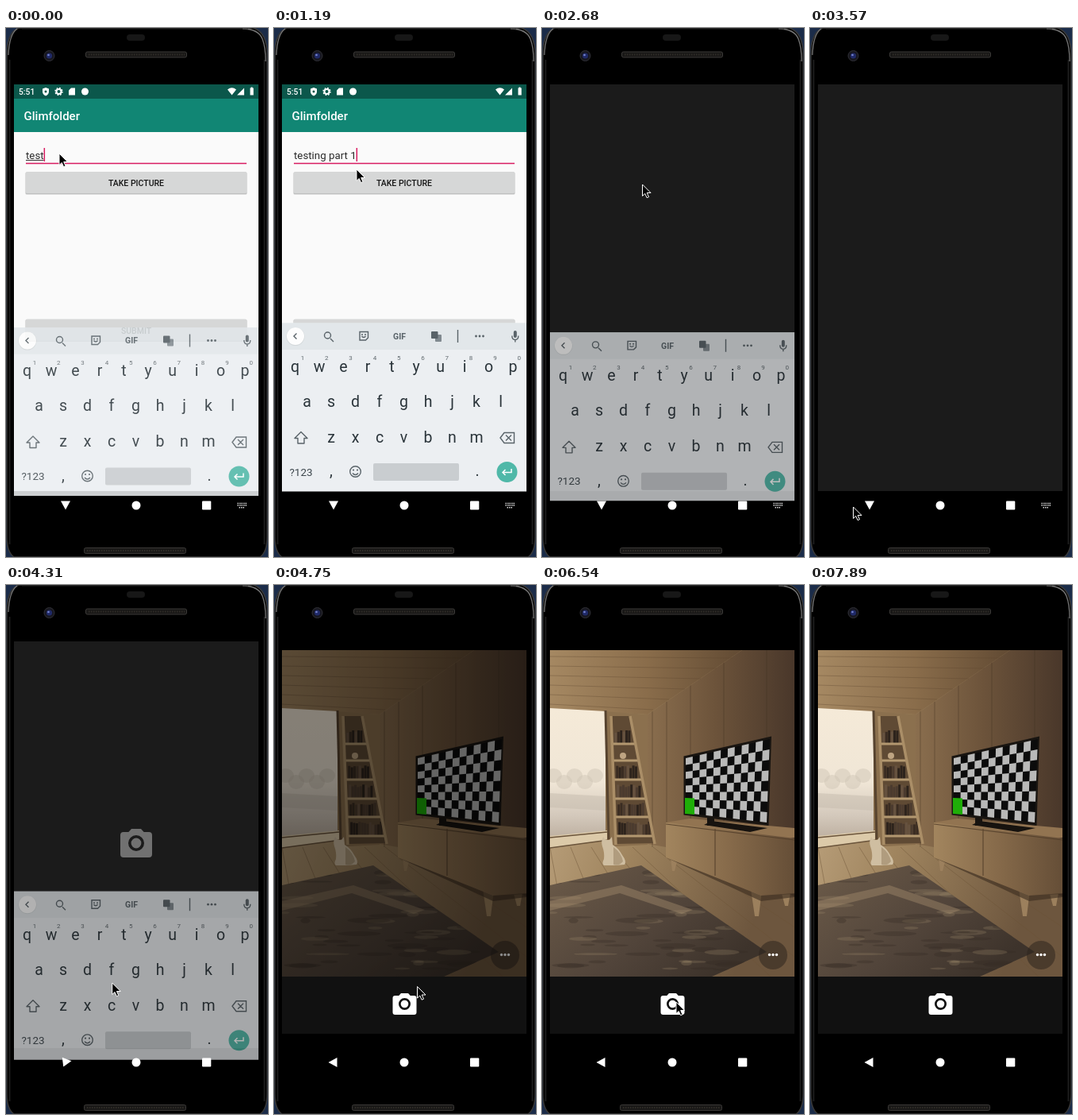
Recreate the animation shown at these times as an HTML page. Size 330 by 666 pixels, loop 8 s.

```html
<!DOCTYPE html>
<html lang="en">
<head>
<meta charset="utf-8">
<title>Phone camera demo</title>
<style>
  html, body { margin: 0; width: 100%; height: 100%; overflow: hidden; background: #000; }
  svg { display: block; width: 100vw; height: 100vh; }
  text { font-family: Roboto, "Open Sans", sans-serif; white-space: pre; }
  .mid { text-anchor: middle; }
  .medium { font-weight: 500; }
  .bold { font-weight: 700; }
  .key { font-size: 19.5px; fill: #2a343a; text-anchor: middle; }
  .hint { font-size: 8px; fill: #5f686d; text-anchor: middle; }
  .dlg { font-size: 13px; letter-spacing: .4px; fill: #eceeee; }
  .line { fill: none; stroke: #596369; stroke-width: 1.4; }
</style>
</head>
<body>
<svg viewBox="0 0 330 666" preserveAspectRatio="none">
  <defs>
    <clipPath id="screen"><path d="M10 71H318V583H10z"/></clipPath>
    <clipPath id="photo"><path d="M10 82H318V493H10z"/></clipPath>
    <clipPath id="rug"><path d="M10 378L125 353 283 462 214 493H10z"/></clipPath>
    <linearGradient id="edge"><stop offset="0" stop-color="#101010"/><stop offset=".5" stop-color="#3c3c3c"/><stop offset="1" stop-color="#090909"/></linearGradient>
    <linearGradient id="ceil"><stop offset="0" stop-color="#a58862"/><stop offset=".5" stop-color="#8a6d4b"/><stop offset="1" stop-color="#614a33"/></linearGradient>
    <linearGradient id="wall"><stop offset="0" stop-color="#8a6e4e"/><stop offset=".45" stop-color="#6d543b"/><stop offset="1" stop-color="#49372a"/></linearGradient>
    <linearGradient id="sky" x2="0" y2="1"><stop offset="0" stop-color="#f5ead8"/><stop offset=".55" stop-color="#f0e6d6"/><stop offset=".8" stop-color="#d3c8bb"/><stop offset="1" stop-color="#b8aa9a"/></linearGradient>
    <linearGradient id="floor" x2="1" y2=".5"><stop offset="0" stop-color="#c9b08c"/><stop offset=".5" stop-color="#a0855f"/><stop offset="1" stop-color="#6d563e"/></linearGradient>
    <linearGradient id="mat" x2="1" y2=".6"><stop offset="0" stop-color="#6c5b49"/><stop offset=".6" stop-color="#51443a"/><stop offset="1" stop-color="#3d332b"/></linearGradient>
    <linearGradient id="chest"><stop offset="0" stop-color="#a2855e"/><stop offset=".5" stop-color="#866a4a"/><stop offset="1" stop-color="#654e37"/></linearGradient>
    <path id="cam" fill-rule="evenodd" d="M-3-10L-4.83-8H-8a2 2 0 0 0-2 2V6a2 2 0 0 0 2 2H8a2 2 0 0 0 2-2V-6a2 2 0 0 0-2-2H4.83L3-10zM5-1A5 5 0 1 1-5-1 5 5 0 1 1 5-1zM3.2-1A3.2 3.2 0 1 0-3.2-1 3.2 3.2 0 1 0 3.2-1z"/>
  </defs>

  <!-- phone body -->
  <rect width="330" height="666" fill="#1b2c49"/>
  <path d="M16 0H312Q329 6 329 34V640Q329 660 320 666H10Q1 660 1 640V34Q1 6 16 0z" fill="#000" stroke="#383838" stroke-width="1.5"/>
  <path d="M4.500 40V650M325.500 40V650" stroke="#1c1c1c" stroke-width="2"/>
  <path d="M14 1Q4 8 3 34M298 1Q318 1 323 14 327 24 327 42" fill="none" stroke="#777" stroke-width="1.3"/>
  <path d="M20 1H305" stroke="#222"/>
  <rect x="152" y="8" width="23" height="8" rx="4" fill="#171717"/>
  <g fill="#191817" stroke="#3b3937">
    <rect x="100.500" y="30" width="127" height="7" rx="2"/>
    <rect x="98.500" y="654.500" width="128" height="7" rx="2"/>
  </g>
  <path d="M104 33.500H225M102 658H224" stroke="#302d28" stroke-width="2" stroke-dasharray="1.500 1.500"/>
  <circle cx="54.500" cy="35" r="6.500" fill="#17171f" stroke="#303036"/>
  <circle cx="54.500" cy="35" r="3.600" fill="#202a68"/>
  <circle cx="53.500" cy="34" r="1.300" fill="#7684cf"/>

  <g clip-path="url(#screen)">
    <g id="form">
      <path fill="#fafafa" d="M10 71H318V583H10z"/>
      <path fill="#118674" d="M10 89H318V131H10z"/>
      <text class="medium" x="22.500" y="115.500" font-size="15" fill="#fff">Glimfolder</text>
      <path fill="#d81b60" d="M25 169.700H303V171.200H25z"/>
      <text id="entry" x="25" y="164.500" font-size="13.3" fill="#2a2a2a"></text>
      <path id="under" stroke="#333"/>
      <path id="caret" stroke="#d81b60" stroke-width="1.500"/>
      <g fill="#bfc0c0"><rect x="24.500" y="181.500" width="279" height="28" rx="1.500"/><rect x="24.500" y="367" width="279" height="28" rx="1.500"/></g>
      <g fill="#d6d7d7"><rect x="25" y="181" width="278" height="27" rx="1.500"/><rect x="25" y="366.500" width="278" height="27" rx="1.500"/></g>
      <g class="mid medium" font-size="10.5" fill="#161616"><text x="164" y="198.700">TAKE PICTURE</text><text x="164" y="384.500">SUBMIT</text></g>
    </g>
    <g id="status">
      <path fill="#0b574b" d="M10 71H318V89H10z"/>
      <g fill="#fff">
        <text class="medium" x="16" y="84" font-size="10.3">5:51</text>
        <path d="M50 75l4 1.500v3.500q0 3.500-4 5.500-4-2-4-5.500v-3.500z"/>
        <circle cx="66.500" cy="80" r="3" fill="none" stroke="#fff" stroke-width="2"/>
        <circle cx="66.500" cy="80" r="4.500" fill="none" stroke="#fff" stroke-width="1.400" stroke-dasharray="1.770"/>
        <path d="M82 75.500h5v9h-8v-6z"/>
        <circle cx="99.500" cy="80" r="4.500"/>
        <path d="M279 77.500q5.500-4.500 11 0l-5.500 7zM300 75.500v9h-9zM307.500 75.500h1v-1h2v1h1.200v9h-4.200z"/>
      </g>
      <circle cx="50" cy="80" r="1.500" fill="#0b574b"/>
    </g>
    <path id="dark" fill="#1b1b1b" d="M10 71H318V583H10z"/>
    <use id="splash" href="#cam" transform="translate(164 327) scale(2)" fill="#fff"/>
  </g>

  <g id="app">
    <path d="M10 71H318V583H10z"/>
    <path fill="#111" d="M10 493H318V565H10z"/>
    <g id="scene" clip-path="url(#photo)"></g>
    <use href="#cam" transform="translate(164.500 529) scale(1.500)" fill="#fff"/>
    <g id="dialog">
      <rect x="19" y="204" width="293" height="294.500" rx="10" fill="#2e3539" opacity=".88"/>
      <text class="dlg bold" x="43" y="245" style="font-size:18px">Entering camera mode</text>
      <text class="dlg" x="43" y="272.500">Hold</text>
      <path d="M75.500 264h3.500l5 8.500h3M81.500 264H87" fill="none" stroke="#eceeee" stroke-width="1.100"/>
      <text class="dlg" x="91" y="272.500">Option to control camera via the</text>
      <text class="dlg" x="43" y="288.500">following methods:</text>
      <rect x="50" y="304" width="26.500" height="36.500" rx="12.500" fill="#fff"/>
      <path d="M50 319H77M63.300 303.500V319" stroke="#343b3e" stroke-width="1.600"/>
      <text class="dlg" x="99" y="326"><tspan class="bold">Rotate</tspan> with mouse</text>
      <path d="M58 360h10v9.500H58zM47 371h10v9.500H47zM58 371h10v9.500H58zM69 371h10v9.500H69z" fill="#fff"/>
      <text class="dlg" x="99" y="374"><tspan class="bold">Move</tspan> with WASDQE keys</text>
      <rect x="45.500" y="409.500" width="15.500" height="15.500" rx="1" fill="none" stroke="#c9cccd" stroke-width="1.600"/>
      <text class="dlg" x="73" y="421.500">Don't remind me again</text>
      <rect x="200" y="440" width="88" height="36" rx="2" fill="#20282b"/>
      <rect x="200" y="439" width="88" height="36" rx="2" fill="#46958a"/>
      <text class="bold mid" x="244" y="461.300" font-size="12" letter-spacing=".5" fill="#fff">GOT IT</text>
    </g>
  </g>

  <g id="board">
    <path fill="#eceff2" d="M10 371.500H318V583.500H10z"/>
    <path fill="#e2e7ea" d="M10 371.500H318V405H10z"/>
    <circle cx="27" cy="388.500" r="11.500" fill="#d3d8da"/>
    <circle cx="27" cy="388" r="11" fill="#fdfdfd"/>
    <g class="line">
      <path d="M28.500 384.500l-3.500 3.500 3.500 3.500M71 391l4 4M231.500 380V396" />
      <circle cx="67.500" cy="387" r="4"/>
      <path d="M108 382.500h10.500v7.500l-3 3H108zM110.500 388q2.500 3 5 0"/>
      <path d="M299.800 387.500q0 5 4 5t4-5M303.800 392.500v3"/>
      <path d="M34 508.500l8 8h-4v6.500h-8v-6.500h-4z" stroke-linejoin="round"/>
      <path d="M285 516l5-6.500h12.500v13H290zM292 512.500l7 7M299 512.500l-7 7"/>
      <circle cx="102.500" cy="558.500" r="6.800"/><path d="M99 560.500q3.500 4 7 0"/>
    </g>
    <g fill="#596369">
      <text class="mid bold" x="158" y="391.700" font-size="10.5">GIF</text>
      <rect x="198" y="382" width="8.500" height="9" rx="1"/><rect x="203" y="386" width="8" height="9" rx="1" opacity=".7"/>
      <circle cx="254.500" cy="388" r="1.400"/><circle cx="259" cy="388" r="1.400"/><circle cx="263.500" cy="388" r="1.400"/>
      <rect x="301.800" y="381" width="4" height="9" rx="2"/>
      <circle cx="111" cy="386" r="1"/><circle cx="115" cy="386" r="1"/>
      <circle cx="100" cy="556.500" r="1.100"/><circle cx="105" cy="556.500" r="1.100"/>
    </g>
    <g id="keys"></g>
    <text class="mid" x="34" y="563.500" font-size="13.500" fill="#3d474d">?123</text>
    <text class="key" x="72" y="564">,</text><text class="key" x="256" y="564">.</text>
    <rect x="125" y="548" width="108" height="22" rx="2" fill="#c9cdd0"/>
    <circle cx="293.500" cy="559" r="13" fill="#4fb8a8"/>
    <path d="M299 555v4.500h-11M291.500 556l-3.500 3.500 3.500 3.500" fill="none" stroke="#fff" stroke-width="1.500"/>
  </g>

  <!-- navigation bar -->
  <g fill="#fff">
    <path id="back" d="M-6 0L5-6V6z"/>
    <circle cx="164" cy="601" r="5.500"/>
    <rect x="247" y="595.500" width="11.300" height="11" rx="1"/>
    <path id="ime" d="M291.500 598.500h11.500M291.500 601h11.500M293.500 603.700h7" fill="none" stroke="#ddd" stroke-width="1.400" stroke-dasharray="1.500 1"/>
  </g>
  <path id="mouse" d="M0 0V14.500L3.300 11.500 5.600 16.700 8 15.700 5.700 10.500H10.500z" fill="#000" stroke="#fff" stroke-width="1"/>
</svg>

<script>
const $ = id => document.getElementById(id);
const NS = 'http://www.w3.org/2000/svg';

function add(parent, tag, attrs, text) {
  const el = document.createElementNS(NS, tag);
  for (const k in attrs) el.setAttribute(k, attrs[k]);
  if (text) el.textContent = text;
  return parent.appendChild(el);
}

// keyboard letters
function row(letters, x, y) {
  [...letters].forEach((c, i) => add($('keys'), 'text', { class: 'key', x: x + i * 30.5, y }, c));
}
row('qwertyuiop', 26.5, 432.500);
row('asdfghjkl', 41.5, 476.500);
row('zxcvbnm', 72, 521.500);
[...'1234567890'].forEach((c, i) => add($('keys'), 'text', { class: 'hint', x: 36 + i * 30.3, y: 418 }, c));

// room
const scene = $('scene');
const shape = (d, fill, opacity = 1) => add(scene, 'path', { d, fill, opacity });
const stroke = (d, color, width = 1, opacity = 1) =>
  add(scene, 'path', { d, fill: 'none', stroke: color, 'stroke-width': width, opacity });
let seed = 7;
const rnd = () => (seed = seed * 16807 % 2147483647) / 2147483647;

function room() {
  shape('M10 82H318V493H10z', 'url(#floor)');
  for (let i = 0; i < 8; i++) stroke(`M${10 + i * 26} 330L${40 + i * 62} 493`, '#6a5237', 1, .45);
  shape('M133 163L252 82H318V392L156 330 133 326z', 'url(#wall)');
  for (let i = 1; i < 6; i++) {
    const x = 133 + i * i * 6;
    stroke(`M${x} ${163 - (x - 133) * .68}V330`, '#3f2e20', 1, .4);
  }
  shape('M10 82H252L133 163 10 156z', 'url(#ceil)');
  for (let i = 0; i < 6; i++) stroke(`M10 ${90 + i * 12}L${240 - i * 20} ${92 + i * 13}`, '#5c452e', 1, .35);
  shape('M78 159L133 163V327L78 330z', '#8b704e');
  shape('M10 155L80 159V318L10 325z', 'url(#sky)');
  for (let i = 0; i < 5; i++) add(scene, 'ellipse', { cx: 15 + i * 13, cy: 240 + i % 2 * 8, rx: 10, ry: 9, fill: '#d0c5b6', opacity: .5 });
  shape('M10 262L80 266V284L10 280z', '#c6bbad', .5);
  shape('M10 316L82 309V321L10 331z', '#dccaa9');
  stroke('M10 331L84 321M10 318L82 311', '#6a543b', 1.500);
  stroke('M80 158L84 320', '#57432f', 3);
  shelf();
  shape('M10 378L125 353 283 462 214 493H10z', 'url(#mat)');
  const rug = add(scene, 'g', { 'clip-path': 'url(#rug)' });
  for (let i = 0; i < 65; i++) {
    const light = rnd() < .45;
    add(rug, 'ellipse', { cx: 10 + rnd() * 250, cy: 358 + rnd() * 132, rx: 6 + rnd() * 22, ry: 1 + rnd() * 2.500,
      fill: light ? '#a18a6d' : '#322a24', opacity: light ? .25 : .3 });
  }
  shape('M10 398L100 378 190 409 176 414 98 388 10 410z', '#aa9271', .4);
  // cat
  shape('M77 317l3 4h5l3-4 1 10q8 5 12 13 6 8 3 12l-12 1H78q-3-2 0-8 1-8-2-16-2-6 1-12z', '#cfbea1');
  shape('M90 330q10 7 12 18-5 6-12 4z', '#9f8a6c', .65);
  // cabinet
  shape('M162 344h9l-4 16h-3zM262 376h16l-5 41h-5zM300 381h14l-4 23h-4z', '#9c805d');
  shape('M156 299L186 294 318 306V318L276 325z', '#927451');
  shape('M156 299L318 319V389L276 391 156 343z', 'url(#chest)');
  stroke('M218 307V366M156 301L318 321', '#503c29', 1.200, .8);
  shape('M156 343L276 391 318 388V393L276 398z', '#3b2c1f', .6);
  tv();
  add(scene, 'circle', { cx: 291, cy: 466, r: 18, fill: '#2e251e', opacity: .55 });
  for (const x of [286.500, 291, 295.500]) add(scene, 'circle', { cx: x, cy: 465.500, r: 1.700, fill: '#fff' });
}

function shelf() {
  const left = y => 87 + (y - 165) * .04;
  const right = y => 111 + (y - 165) * .195;
  shape('M87 165L111 165 142 325 93 326z', '#5f4a34');
  [200, 221, 245, 269, 292, 316].forEach((y, i) => {
    const a = left(y) + 3, b = right(y) - 4;
    if (i === 1) add(scene, 'circle', { cx: 102, cy: 215, r: 4, fill: '#bfa582' });
    else for (let x = a; x < b - 3; x += 3.400) {
      const h = 14 + rnd() * 4;
      shape(`M${x} ${y - h}h3v${h}h-3z`, ['#3a2c22', '#4b3b2f', '#2d231c', '#665240'][rnd() * 4 | 0]);
    }
    stroke(`M${a - 3} ${y}H${b + 3}`, '#b39870', 3);
  });
  stroke('M87 165L93 327M111 165L142 326', '#aa8e67', 3.500);
}

function tv() {
  shape('M204 302L214 297 284 306 262 311z', '#17130f');
  shape('M208 290h9v13h-9z', '#17130f');
  shape('M178.500 215.500L289 190.500 285.500 303 178.500 289.500z', '#191511');
  const cols = 12, rows = 8;
  const at = (c, r) => {
    const u = c / cols, v = r / rows;
    const top = 218 - 24 * u, bottom = 287 + 12 * u;
    return `${(181 + (106 - 4 * v) * u).toFixed(1)} ${(top + (bottom - top) * v).toFixed(1)}`;
  };
  const cell = (c, r, w, h) => `M${at(c, r)}L${at(c + w, r)} ${at(c + w, r + h)} ${at(c, r + h)}z`;
  shape(cell(0, 0, cols, rows), '#0c0c0c');
  for (let r = 0; r < rows; r++)
    for (let c = r % 2; c < cols; c += 2) shape(cell(c, r, 1, 1), '#b9b9b8');
  shape('M180 268L192 268.500V289L180 288z', '#1fae08');
}
room();

// linear interpolation over [time, value, ...] stops
function track(t, stops) {
  let i = 0;
  while (i < stops.length - 2 && t >= stops[i + 1][0]) i++;
  const a = stops[i], b = stops[i + 1];
  const k = Math.min(1, Math.max(0, (t - a[0]) / (b[0] - a[0])));
  return a.slice(1).map((v, n) => v + (b[n + 1] - v) * k);
}

const pointer = [[0, 67, 158], [740, 67, 158], [1190, 104, 178], [1490, 126.5, 197], [2900, 126.5, 197],
  [3560, 54.5, 603], [3720, 54.5, 603], [4310, 133.5, 501], [4750, 180.5, 505.500], [5200, 180.5, 505.500],
  [5640, 231, 457], [6240, 231, 457], [6540, 169, 525], [6700, 166, 530], [7140, 133, 407], [7290, 132, 403]];
const slide = [[0, 5.5], [300, 0], [2380, 0], [2680, 12], [2760, 42], [3570, 42], [3720, 14], [4020, 0],
  [4110, 0], [4310, 14], [4600, 42]];
const PHRASE = 'testing part 1';

const show = (id, on) => { $(id).style.display = on ? '' : 'none'; };
const fade = (id, o) => { $(id).style.opacity = o; show(id, o > 0); };

function typing(t) {
  const text = PHRASE.slice(0, 4 + Math.round(Math.min(1, t / 1180) * 10));
  const entry = $('entry');
  entry.textContent = text;
  const len = n => n ? entry.getSubStringLength(0, n) : 0;
  const end = 25 + entry.getComputedTextLength();
  const start = 25 + len(text.lastIndexOf(' ') + 1);
  $('under').setAttribute('d', `M${start} 166.500H${end}`);
  show('under', /[a-z]$/.test(text));
  $('caret').setAttribute('d', `M${end + .700} 151V168`);
  show('caret', t < 1480 || t >= 1920);
}

function zoom(id, s) {
  $(id).setAttribute('transform', `translate(164 327) scale(${s}) translate(-164 -327)`);
}

function draw(t) {
  typing(t);
  zoom('form', track(t, [[2080, 1], [2230, 1.006], [2400, 1.05], [2680, 1.12]])[0]);
  const dark = track(t, [[2230, 0], [2660, 1]])[0];
  fade('dark', dark);
  zoom('dark', .85 + .15 * dark);
  show('form', dark < 1);
  show('status', dark < 1);
  fade('splash', track(t, [[4020, 0], [4310, .37], [4600, 1]])[0]);

  const off = track(t, slide)[0];
  $('board').setAttribute('transform', `translate(0 ${off})`);
  fade('board', Math.max(0, 1 - off / 42));
  const turn = track(t, [[4160, -90], [4300, -180], [4600, -360]])[0];
  const [bx, by] = track(t, [[4160, 75, 600.5], [4310, 76.5, 600], [4600, 74.5, 601]]);
  $('back').setAttribute('transform', `translate(${bx} ${by}) rotate(${turn})`);
  show('ime', t < 4200);

  show('app', t >= 4590);
  fade('scene', track(t, [[4600, 0], [4890, 1]])[0]);
  fade('dialog', t < 5300 ? track(t, [[4890, 0], [5190, 1]])[0] : track(t, [[5640, 1], [5930, 0]])[0]);

  const [x, y] = track(t, pointer);
  $('mouse').setAttribute('transform', `translate(${x} ${y})`);
  show('mouse', t < 7870);
}

const LOOP = 8000, STEP = 148.7;
const begin = performance.now();
function tick() {
  const t = (performance.now() - begin) % LOOP;
  draw(Math.floor((t + 10) / STEP) * STEP);
  requestAnimationFrame(tick);
}
tick();
</script>
</body>
</html>
```
